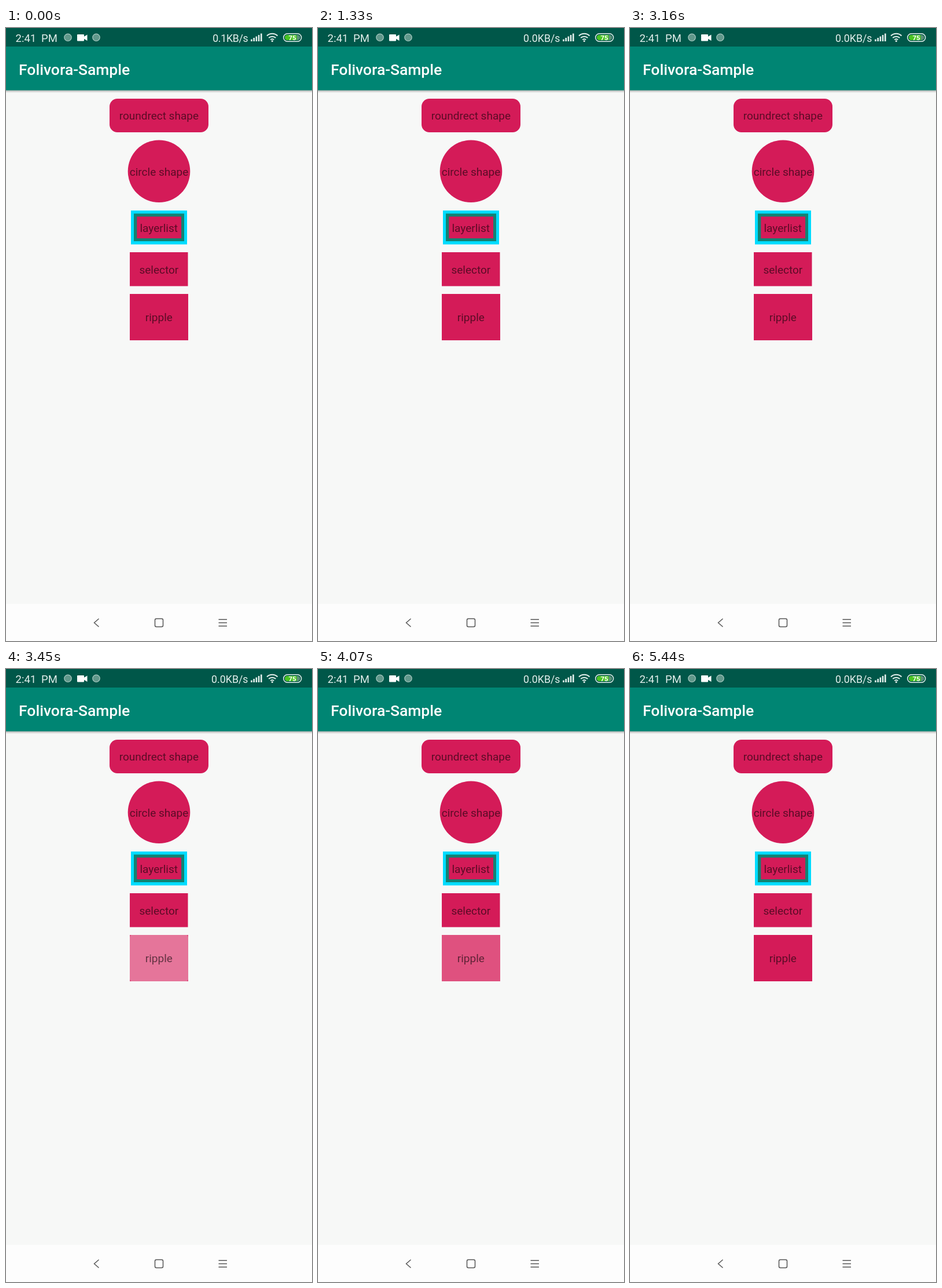
Animation of 529 by 1058 pixels, one loop 5480 ms. Source, as an HTML page:

```html
<!DOCTYPE html>
<html lang="en">
<head>
<meta charset="utf-8">
<title>Folivora-Sample</title>
<style>
  html, body { margin: 0; width: 100%; height: 100%; overflow: hidden; background: #f7f8f7; }
  svg { display: block; width: 100%; height: 100%; }
  text { font-family: Roboto, sans-serif; }
  .status { fill: #e4efec; font-size: 18.5px; }
  .labels text { font-size: 19px; text-anchor: middle; fill: #000; fill-opacity: .57; }
  .accent { fill: #d41b58; }
</style>
</head>
<body>
<svg viewBox="0 0 529 1058">
  <defs>
    <linearGradient id="shadow" x2="0" y2="1">
      <stop stop-color="#000" stop-opacity=".3"/>
      <stop offset="1" stop-color="#000" stop-opacity="0"/>
    </linearGradient>
    <clipPath id="rippleBox"><rect x="214" y="459" width="101" height="80"/></clipPath>
  </defs>

  <rect width="529" height="1058" fill="#f7f8f7"/>
  <rect y="107" width="529" height="5" fill="url(#shadow)"/>
  <rect y="32" width="529" height="75.5" fill="#008573"/>
  <rect width="529" height="32" fill="#005749"/>
  <text x="22" y="81" font-size="26.5" font-weight="500" fill="#fff">Folivora-Sample</text>

  <g class="status">
    <text x="16.5" y="23.5">2:41</text>
    <text x="61" y="23.5">PM</text>
    <text id="speed" x="418.5" y="23.5" text-anchor="end" style="font-size:17.8px"></text>
    <g fill="#61988b" stroke="#a9c9c1" stroke-width="1.2">
      <circle cx="107" cy="16.3" r="6.2"/>
      <circle cx="156" cy="16.3" r="6.2"/>
    </g>
    <path fill="#fff" d="M124 11h10a1 1 0 0 1 1 1v2.800l5.500-3.300v10.500l-5.500-3.300v2.800a1 1 0 0 1-1 1h-10a1 1 0 0 1-1-1v-9.500a1 1 0 0 1 1-1z"/>
    <path stroke="#e4efec" stroke-width="2.600" d="M424.500 23v-3.500M428.700 23v-6M432.900 23v-8.500M437.100 23v-11M441.300 23v-13.500"/>
    <g fill="none" stroke="#e4efec" stroke-width="2">
      <path d="M451 13.500a13.500 13.500 0 0 1 18.500 0M454.200 17a9 9 0 0 1 12.100 0M457.300 20.200a4.600 4.600 0 0 1 5.900 0"/>
    </g>
    <circle cx="460.250" cy="22.500" r="1.600"/>
    <rect x="479.700" y="9.700" width="31" height="13.600" rx="6.800" fill="none" stroke="#e4efec" stroke-width="1.500"/>
    <rect x="482" y="12" width="26.500" height="9" rx="4.500" fill="#5a8f78"/>
    <path fill="#49c422" d="M486.500 12h16v9h-16a4.500 4.500 0 0 1 0-9z"/>
    <text x="495" y="20.600" text-anchor="middle" style="font-size:11.500px;font-weight:700;fill:#fff">75</text>
  </g>

  <g class="accent">
    <rect x="179" y="122" width="171" height="58" rx="13.500"/>
    <circle cx="264.500" cy="247.300" r="53.800"/>
    <rect x="216" y="315" width="97" height="58.500" fill="#00dcff"/>
    <rect x="221" y="320.300" width="87" height="47.700" fill="#128273"/>
    <rect x="226.300" y="325.500" width="76.700" height="37.500"/>
    <rect id="selector" x="214" y="387" width="100.500" height="58.500"/>
    <rect x="214" y="459" width="101" height="80"/>
  </g>
  <g clip-path="url(#rippleBox)" fill="#fff">
    <rect id="wash" x="214" y="459" width="101" height="80"/>
    <circle id="wave" cx="264.500" cy="499"/>
  </g>
  <g class="labels">
    <text x="264.300" y="158">roundrect shape</text>
    <text x="264.500" y="254.500">circle shape</text>
    <text x="264.200" y="351.500">layerlist</text>
    <text x="264.300" y="423.500">selector</text>
    <text x="264.300" y="506.300">ripple</text>
  </g>

  <rect y="994" width="529" height="64" fill="#fdfdfd"/>
  <g fill="none" stroke="#565656" stroke-width="1.500">
    <path d="M160.500 1019.500l-8 7 8 7"/>
    <rect x="257.500" y="1019.500" width="14" height="14" rx="2.500"/>
    <path d="M367.500 1020.800h14.500M367.500 1026.500h14.500M367.500 1032.200h14.500"/>
  </g>
</svg>
<script>
  const LOOP = 5480;
  const PRESS = [420, 700];
  const RIPPLE = { start: 3220, grow: 300, release: 3860, fade: 430 };
  const $ = id => document.getElementById(id);
  const speed = $('speed'), selector = $('selector'), wash = $('wash'), wave = $('wave');
  const progress = (t, start, span) => Math.min(1, Math.max(0, (t - start) / span));
  let lastSpeed;

  function draw(t) {
    const rate = t < 1330 ? '0.1KB/s' : '0.0KB/s';
    if (rate !== lastSpeed) {
      speed.textContent = lastSpeed = rate;
      speed.style.letterSpacing = t < 1330 ? '-.3px' : '0';
    }
    selector.style.fill = t >= PRESS[0] && t < PRESS[1] ? '#008573' : '';

    const grow = progress(t, RIPPLE.start, RIPPLE.grow);
    const fade = 1 - progress(t, RIPPLE.release, RIPPLE.fade);
    const spread = 1 - (1 - grow) ** 2;
    wash.setAttribute('opacity', .25 * grow * fade);
    wave.setAttribute('opacity', .25 * Math.min(1, grow * 3) * fade);
    wave.setAttribute('r', 66 * spread);
  }

  const begin = performance.now();
  function tick() {
    draw((performance.now() - begin) % LOOP);
    requestAnimationFrame(tick);
  }
  tick();
</script>
</body>
</html>
```
